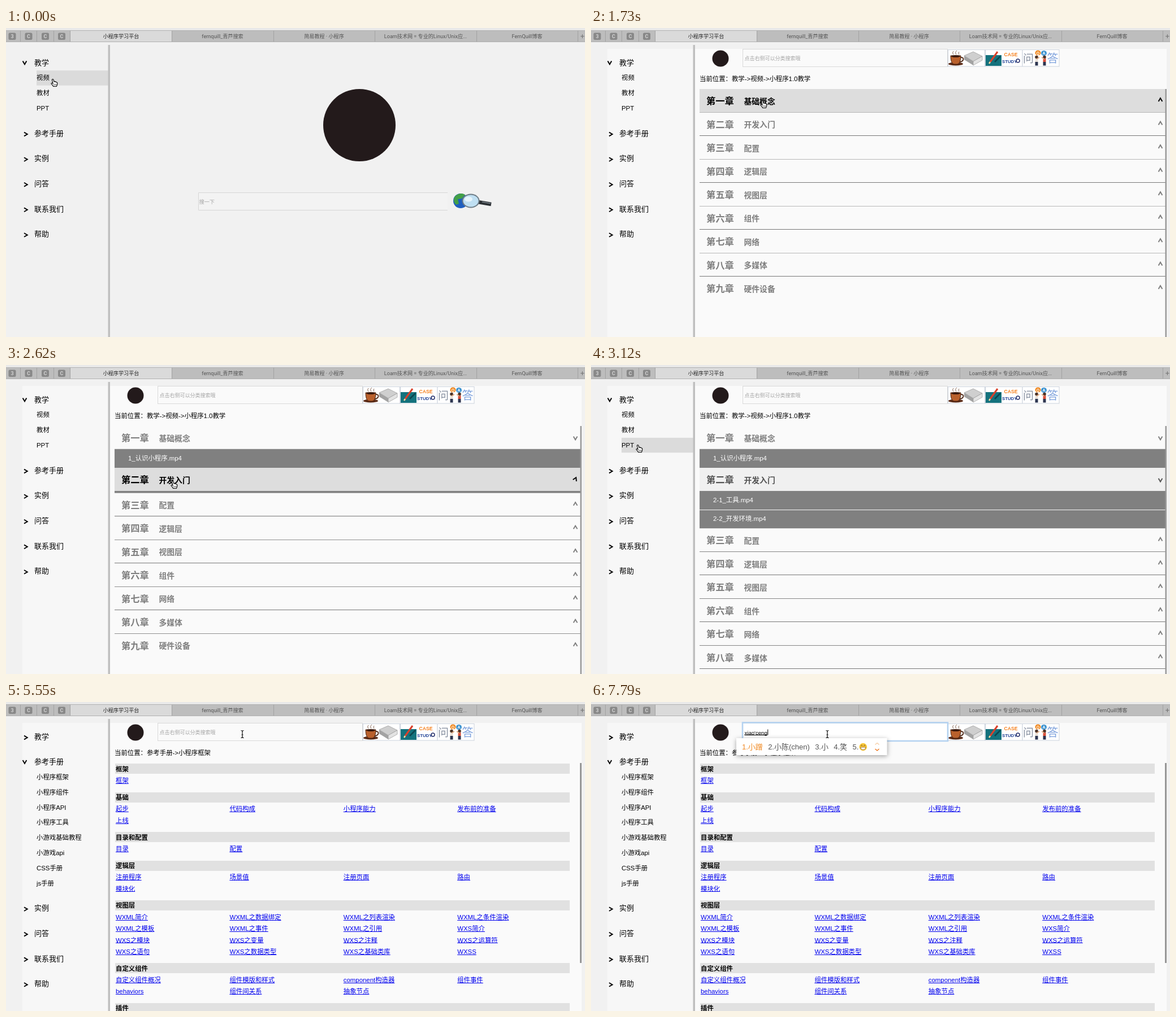
Animation, 1024 px wide and 547 px high, one loop 8000 ms. Source, as an HTML page with a canvas:

```html
<!DOCTYPE html>
<html lang="zh-CN">
<head>
<meta charset="utf-8">
<title>小程序学习平台</title>
<style>
html, body { margin: 0; width: 100%; height: 100%; overflow: hidden; background: #f1f1f1; }
canvas { display: block; }
</style>
</head>
<body>
<canvas id="stage" width="1024" height="547"></canvas>
<script>
const ctx = document.getElementById('stage').getContext('2d');
const LOOP = 8000;
const SANS = '"Liberation Sans", "Noto Sans CJK SC", "Noto Sans CJK", sans-serif';
const UI = 'Roboto, "Noto Sans CJK SC", "Noto Sans CJK", sans-serif';

const TICKS = [0, 140, 290, 450, 600, 770, 940, 1120, 1290, 1430, 1580, 1730, 1880, 2030, 2170, 2320,
  2470, 2620, 2770, 2950, 3120, 3300, 3450, 3590, 3890, 4040, 4190, 4340, 4490, 4640,
  4940, 5090, 5240, 5400, 5550, 5850, 6300, 6740, 6890, 7040, 7340, 7640, 7790];

const VIDEO_AT = 290, MANUAL_AT = 4940, FOCUS_AT = 5850;

const MENU = [
  ['教学', ['视频', '教材', 'PPT']],
  ['参考手册', ['小程序框架', '小程序组件', '小程序API', '小程序工具', '小游戏基础教程', '小游戏api', 'CSS手册', 'js手册']],
  ['实例', []], ['问答', []], ['联系我们', []], ['帮助', []]
];
// from, to, menu, entry
const HOVERS = [[0, 450, 0, 0], [2950, 3300, 0, 2], [4190, 4490, 1, 2], [4490, 4640, 1, 1], [4640, 4940, 1, 0]];

// title, files, hover start, hover end, click time
const CHAPTERS = [
  ['基础概念', ['1_认识小程序.mp4'], 900, 2100, 1880],
  ['开发入门', ['2-1_工具.mp4', '2-2_开发环境.mp4'], 2050, 2910, 2565],
  ['配置'], ['逻辑层'], ['视图层'], ['组件'], ['网络'], ['多媒体'], ['硬件设备']
];

const MANUAL = [
  ['框架', '框架'],
  ['基础', '起步 代码构成 小程序能力 发布前的准备 上线'],
  ['目录和配置', '目录 配置'],
  ['逻辑层', '注册程序 场景值 注册页面 路由 模块化'],
  ['视图层', 'WXML简介 WXML之数据绑定 WXML之列表渲染 WXML之条件渲染 WXML之模板 WXML之事件 WXML之引用 WXS简介 ' +
    'WXS之模块 WXS之变量 WXS之注释 WXS之运算符 WXS之语句 WXS之数据类型 WXS之基础类库 WXSS'],
  ['自定义组件', '自定义组件概况 组件模版和样式 component构造器 组件事件 behaviors 组件间关系 抽象节点'],
  ['插件', '']
];

// An empty candidate stands for the grinning face.
const TYPING = [
  [6740, 'x', '下,小,想,现,型'],
  [6890, 'xi', '系,西,喜,洗,细'],
  [7040, 'xiao', '小,笑,校,效,'],
  [7340, "xiao'c", '小吃,小菜,小车,小草,小'],
  [7640, "xiao'ce", '小册,小测,小侧,小,笑'],
  [7790, "xiao'ceng", '小蹭,小陈(chen),小,笑,']
];

// time, x, y
const PATH = [[0, 85, 97], [450, 85, 97], [1120, 305, 135], [2030, 305, 135], [2320, 297, 212], [2770, 297, 212],
  [3120, 85, 148], [3450, 90, 187], [4190, 90, 187], [4340, 90, 174], [4640, 88, 136], [4940, 88, 136], [5550, 418, 57]];

const clamp = v => Math.min(1, Math.max(0, v));
const lerp = (a, b, k) => a + (b - a) * k;
const swing = v => 0.5 - Math.cos(clamp(v) * Math.PI) / 2;
const easeOut = v => 1 - (1 - clamp(v)) ** 2;
const gray = v => `rgb(${v},${v},${v})`;

function rect(x, y, w, h, color) {
  ctx.fillStyle = color;
  ctx.fillRect(x, y, w, h);
}

function frame(x, y, w, h, color, width = 1) {
  ctx.strokeStyle = color;
  ctx.lineWidth = width;
  ctx.strokeRect(x, y, w, h);
}

function oval(x, y, rx, ry, color) {
  ctx.fillStyle = color;
  ctx.beginPath();
  ctx.ellipse(x, y, rx, ry, 0, 0, 7);
  ctx.fill();
}

function shape(d, fill, stroke, width = 1) {
  const path = new Path2D(d);
  if (fill) { ctx.fillStyle = fill; ctx.fill(path); }
  if (stroke) { ctx.strokeStyle = stroke; ctx.lineWidth = width; ctx.stroke(path); }
}

// Draws text centred on the line y and returns its width.
function text(s, x, y, size, color = '#000', { bold = '', align = 'left', font = SANS } = {}) {
  ctx.font = `${bold} ${size}px ${font}`;
  ctx.textAlign = align;
  ctx.fillStyle = color;
  ctx.fillText(s, x, y + size * 0.37);
  return ctx.measureText(s).width;
}

function chevron(x, y, angle, color) {
  ctx.save();
  ctx.translate(x, y);
  ctx.rotate(angle);
  shape('M-3 -3.4L2.8 0L-3 3.4', null, color, 1.9);
  ctx.restore();
}

function clipped(x, y, w, h, draw) {
  ctx.save();
  ctx.beginPath();
  ctx.rect(x, y, w, h);
  ctx.clip();
  draw();
  ctx.restore();
}

function tabBar() {
  rect(0, 0, 1024, 5, '#e9e9e9');
  rect(0, 5, 1024, 19, '#bdbdbd');
  rect(113, 5, 180, 19, '#dadada');
  rect(0, 4, 1024, 1, '#b2b2b2');
  rect(0, 24, 1024, 1, '#b0b0b0');
  [25, 54, 84, 113, 293, 473, 652, 832, 1011].forEach(x => rect(x, 5, 1, 19, '#a2a2a2'));
  [11, 40, 69.5, 98.5].forEach((x, i) => {
    ctx.fillStyle = '#888';
    ctx.beginPath();
    ctx.roundRect(x - 6.5, 8.5, 13, 12.5, 2.5);
    ctx.fill();
    text(i ? 'C' : '3', x, 14.8, 9, '#d2d2d2', { bold: 'bold', align: 'center', font: UI });
  });
  ['小程序学习平台', 'fernquill_青芦搜索', '简易教程 · 小程序', 'Loam技术网 = 专业的Linux/Unix应...', 'FernQuill博客'].forEach((s, i) =>
    text(s, 203.5 + i * 179.5, 14.5, 9.1, i ? '#555' : '#222', { align: 'center', font: UI }));
  text('+', 1019.5, 14.5, 13, '#777', { align: 'center', font: UI });
}

function sidebar(t) {
  const swap = swing((t - 3840) / 400);
  const hover = HOVERS.find(h => t >= h[0] && t < h[1]);
  let y = 61;
  MENU.forEach(([name, entries], i) => {
    const open = [1 - swap, swap][i] || 0, height = entries.length * 26.8 * open;
    chevron(35 - 2 * open, y + 2 - 1.5 * open, open * Math.PI / 2, '#000');
    text(name, 50, y, 13);
    clipped(29, y + 13.5, 152, height + 0.5, () => entries.forEach((entry, j) => {
      const row = y + 27.2 + j * 26.8;
      if (hover && hover[2] === i && hover[3] === j) rect(54, row - 13, 127, 26.5, '#dbdbdb');
      text(entry, 54, row, 11.4);
    }));
    y += 44.6 + height;
  });
  rect(180.5, 30, 3.5, 517, '#bfbfbf');
}

function home() {
  oval(625, 172, 64, 64, '#231a1b');
  shape('M781 291.5H340.5V322.5H781', '#f3f3f3', '#d6d6d6');
  text('搜一下', 341.5, 307.5, 9.2, '#a5a5a5');
  oval(804, 306, 13, 13, '#1f5fc0');
  shape('M794 298Q803 290 812 295L806 302L799 303L801 311L796 313Q789 306 794 298Z', '#43a047');
  shape('M835 308L858 312', null, '#2b2f33', 6.5);
  shape('M842 308L857 310.5', null, '#7b858c', 1.3);
  oval(822, 306, 15.5, 12.5, '#6e7c86');
  oval(822, 306, 13.5, 10.5, '#bfdff2');
  oval(818, 303, 7, 4.5, '#e6f4fb');
}

function categoryIcons() {
  [631, 697, 762.5].forEach(x => {
    rect(x, 38, 65, 30, '#fff');
    frame(x + 0.5, 38.5, 65, 29.5, '#ccd3dd');
  });
  // Coffee and book
  oval(645, 63.5, 13, 3, '#5a2a16');
  shape('M636 49H654Q654 63 648 64H642Q636 63 636 49Z', '#b9602c', '#4a2413');
  shape('M654 52Q660 52 658 57Q656 60 652 60', null, '#4a2413', 1.8);
  oval(645, 50, 8, 2, '#3a1a0e');
  shape('M641 47Q638 44 641 41M646 47Q643 43 647 40M651 47Q649 44 651 42', null, '#8a6a58');
  shape('M660 49L676 42L692 50L676 59Z', '#cfcfcf', '#999', 0.7);
  shape('M660 49L676 59V66L660 56Z', '#a3a3a3');
  shape('M676 59L692 50V57L676 66Z', '#e3e3e3', '#999', 0.7);
  // Case study
  rect(698, 48, 28, 19, '#14727d');
  shape('M706 60L719 42', null, '#d9412b', 3);
  shape('M704 63L706 60', null, '#f5d9a0', 2.5);
  shape('M714 60L724 50', null, '#0b4650', 2.5);
  text('CASE', 742.5, 46.5, 8.6, '#f58220', { bold: 'bold', align: 'center' });
  text('STUDY', 727, 59, 7.8, '#1d3f94', { bold: 'bold' });
  ctx.beginPath();
  ctx.arc(755, 58, 3, 0, 7);
  ctx.strokeStyle = '#27306b';
  ctx.lineWidth = 1.5;
  ctx.stroke();
  // Questions and answers
  text('问', 773.5, 54, 19, '#8790a0', { align: 'center' });
  text('答', 816.5, 54, 20, '#7fa2dc', { align: 'center' });
  oval(790.5, 44, 5, 4.5, '#f08a24');
  oval(801, 44.5, 5, 4.5, '#3d93d0');
  text('Q', 790.5, 44, 7, '#fff', { bold: 'bold', align: 'center' });
  text('A', 801, 44.5, 7, '#fff', { bold: 'bold', align: 'center' });
  [[788, '#e8e0d8', 1], [802, '#d94f3a', -1]].forEach(([x, shirt, side]) => {
    oval(x, 51.5, 2.8, 2.8, '#4b3226');
    rect(x - 2.5, 54, 5, 6, shirt);
    rect(x - 2.5, 60, 5, 6.5, '#2c3550');
    shape(`M${x} 55L${x + side * 5} 52`, null, '#e0a981', 1.5);
  });
}

function pageHeader(crumbs, t) {
  oval(229, 54, 14.5, 14.5, '#231a1b');
  rect(269, 38, 362, 30, t < FOCUS_AT ? '#fafafa' : '#fff');
  frame(268.5, 37.5, 362, 31, '#d9d9d9');
  categoryIcons();
  if (t >= FOCUS_AT) frame(268, 36.5, 363, 32.5, '#b4d2f0', 2.6);
  if (t < TYPING[0][0]) text('点击右侧可以分类搜索哦', 271.5, 54, 9, '#a5a5a5');
  text('当前位置：' + crumbs, 192, 89.5, 11.4);
}

function chapterList(t) {
  let y = 108;
  CHAPTERS.forEach(([title, files = [], hoverIn, hoverOut, click], i) => {
    const lit = hoverIn ? easeOut((t - hoverIn) / 500) * (1 - easeOut((t - hoverOut) / 500)) : 0;
    const turn = click ? clamp((t - click) / 400) : 0;
    const height = files.length * 32.8 * swing(turn);
    const ink = gray(Math.round(lerp(126, 0, lit)));
    rect(192, y, 824, 41, gray(Math.round(lerp(250, 221, lit))));
    text(`第${'一二三四五六七八九'[i]}章`, 204, y + 21, 16.3, ink, { bold: 'bold' });
    text(title, 270.5, y + 21.5, 13.8, ink, { bold: 'bold' });
    chevron(1007, y + 19 + 2.5 * turn, (turn - 0.5) * Math.PI, ink);
    if (i < 8) rect(192, Math.round(y + 40.5), 824, 1, '#777');
    if (height) clipped(192, y + 40.5, 824, height + 1, () => files.forEach((file, j) => {
      const top = y + 40.5 + j * 33;
      rect(192, top, 824, 34, '#808080');
      if (j) rect(192, Math.round(top), 824, 1, '#f4f4f4');
      text(file, 216, top + 16, 11.4, '#fff');
    }));
    y += 41.5 + height;
  });
  rect(1015.5, 108, 2.5, 439, '#999');
}

function manual() {
  let y = 118.4;
  MANUAL.forEach(([title, links]) => {
    rect(193, Math.round(y - 9), 804, 18, '#e1e1e1');
    text(title, 194, y, 11.4, '#000', { bold: 'bold' });
    const list = links.split(' ');
    list.forEach((link, i) => {
      const x = 194 + (i % 4) * 201.4, row = y + 20.5 + Math.floor(i / 4) * 20.3;
      const width = text(link, x, row, 11.4, '#0000ee');
      rect(x, Math.round(row + 5), width, 1, '#0000ee');
    });
    y += Math.ceil(list.length / 4) * 20.3 + 30;
  });
  rect(1015, 108, 3, 354, '#979797');
}

function grin(x, y) {
  oval(x, y, 6.8, 6.8, '#f9c83a');
  shape(`M${x - 4.5} ${y + 0.5}H${x + 4.5}Q${x + 4} ${y + 5} ${x} ${y + 5}Q${x - 4} ${y + 5} ${x - 4.5} ${y + 0.5}Z`, '#fff', '#8a5a1c', 0.8);
  shape(`M${x - 4} ${y - 2}q1.5 -2.5 3 0M${x + 1} ${y - 2}q1.5 -2.5 3 0`, null, '#6b4312');
}

function inputMethod(t) {
  const [, typed, words] = TYPING.filter(step => t >= step[0]).pop();
  const width = text(typed, 271.5, 54, 9.6);
  rect(271.5, 58, width, 1, '#000');
  rect(272 + width, 48.5, 1, 10, '#000');

  const items = words.split(',').map((word, i) => [`${i + 1}.${word}`, !word]);
  ctx.font = `13px ${SANS}`;
  const total = items.reduce((sum, [label, face]) => sum + ctx.measureText(label).width + (face ? 15 : 0) + 9.3, 0);
  ctx.save();
  ctx.shadowColor = 'rgba(0,0,0,.35)';
  ctx.shadowBlur = 8;
  ctx.shadowOffsetY = 2;
  rect(257, 64, total + 36, 30, '#fff');
  ctx.restore();

  let x = 267;
  items.forEach(([label, face], i) => {
    x += text(label, x, 79.5, 13, i ? '#555' : '#f08a24');
    if (face) { grin(x + 8, 79.5); x += 15; }
    x += 9.3;
  });
  shape(`M${x + 5} 75.5l3.5 -3l3.5 3`, null, '#f6cba0', 1.2);
  shape(`M${x + 5} 83l3.5 3l3.5 -3`, null, '#ee7a24', 1.4);
}

function pointer(t) {
  const next = PATH.findIndex(p => p[0] > t);
  const to = PATH.at(next), from = next > 0 ? PATH[next - 1] : to;
  const k = from === to ? 0 : swing((t - from[0]) / (to[0] - from[0]));
  ctx.save();
  ctx.translate(lerp(from[1], to[1], k), lerp(from[2], to[2], k));
  if (t >= 5400) {
    shape('M-2.5 -6.5Q0 -6.5 0 -4.5Q0 -6.5 2.5 -6.5M0 -5V5M-2.5 6.5Q0 6.5 0 4.5Q0 6.5 2.5 6.5M-1.5 1H1.5', null, '#111', 1.2);
  } else {
    shape('M-3.6 -5.5Q-2.4 -7.6 -1 -5.5L0 -2Q1.3 -3 2.3 -1.6Q3.7 -2.4 4.3 -0.9Q5.9 -1 5.8 1.2Q5.8 4 4.3 6.5H-1.2' +
      'Q-2.6 3.8 -4.8 1.8Q-5.4 0 -3.4 0.2L-2 1.3Z', '#fff', '#000', 1.1);
    shape('M0 2V5M2 2V5M3.8 2V5', null, '#000', 0.6);
  }
  ctx.restore();
}

function draw(t) {
  rect(0, 0, 1024, 547, '#f1f1f1');
  tabBar();
  if (t < VIDEO_AT) {
    home();
  } else {
    rect(29, 37, 152, 510, '#f7f7f7');
    rect(184, 37, 834, 510, '#fafafa');
    pageHeader(t < MANUAL_AT ? '教学->视频->小程序1.0教学' : '参考手册->小程序框架', t);
    if (t < MANUAL_AT) chapterList(t);
    else manual();
  }
  sidebar(t);
  if (t >= TYPING[0][0]) inputMethod(t);
  else if (t >= FOCUS_AT && t < 6300) rect(271, 48, 1, 11, '#000');
  pointer(t);
}

let start;
function play(now) {
  start ??= now;
  const t = (now - start) % LOOP;
  draw(TICKS.filter(tick => tick <= t).pop() ?? 0);
  requestAnimationFrame(play);
}
draw(0);
requestAnimationFrame(play);
</script>
</body>
</html>
```
